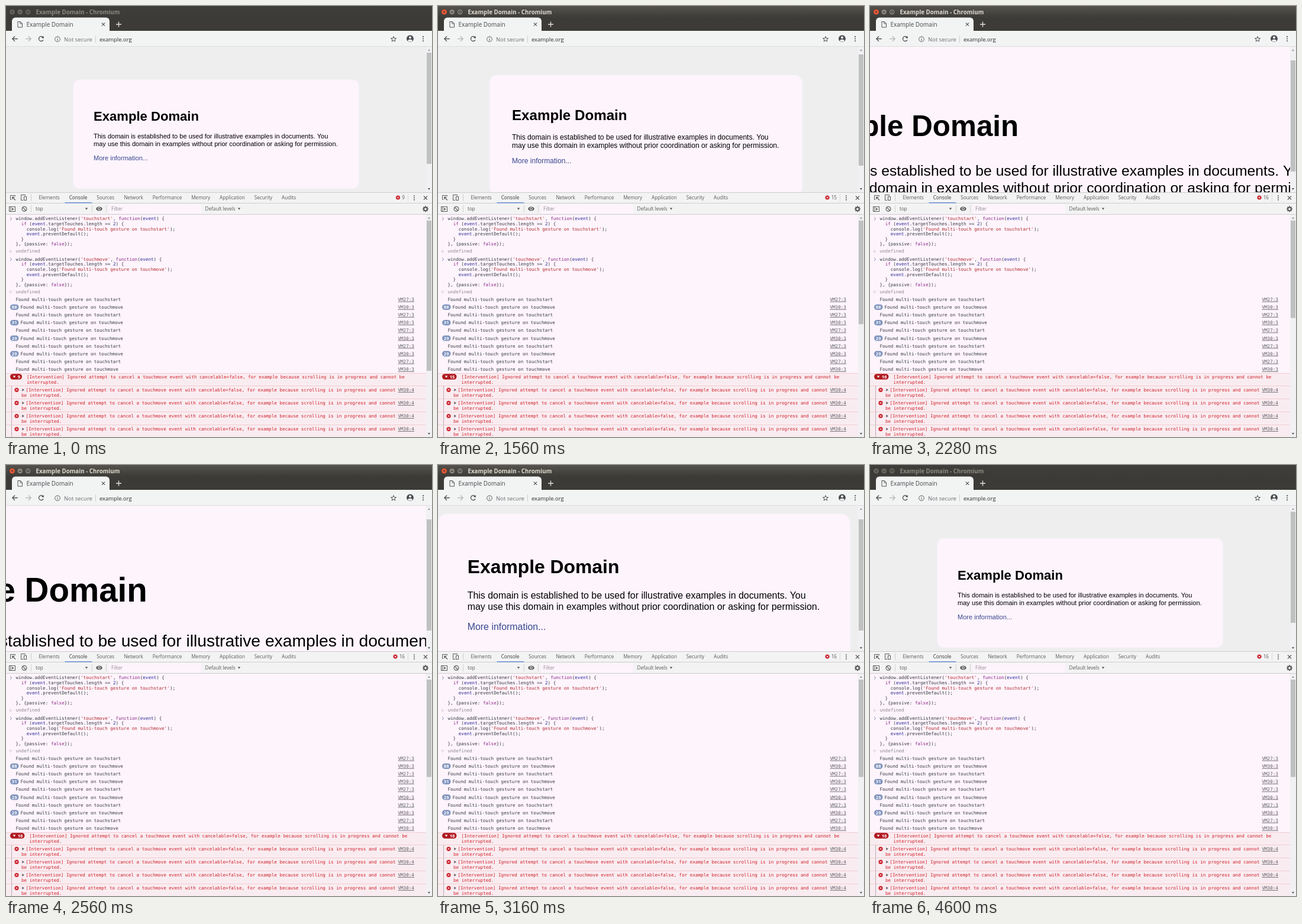
Recreate the animation shown at these times as an HTML page with a canvas. Size 720 px wide and 729 px high, loop 4640 ms.

```html
<!DOCTYPE html>
<html lang="en">
<head>
<meta charset="utf-8">
<title>Pinch zoom with console</title>
<style>
html, body { margin: 0; width: 100%; height: 100%; overflow: hidden; }
canvas { display: block; }
</style>
</head>
<body>
<canvas id="stage" width="720" height="729"></canvas>
<script>
const ctx = document.getElementById('stage').getContext('2d');
const LOOP = 4640, STEP = 40;
const UI = '"Open Sans", "Noto Sans", sans-serif';
const MONO = '"DejaVu Sans Mono", monospace';
const ARIAL = '"Liberation Sans", Arial, sans-serif';
const PAPER = '#fdf4fc', BAR = '#f3f3f3', INK = '#5a5a5a', RED = '#d0202a';
const CHAR = 4.57, ROW = 8.63;

// Two pinches out, two pinches back; x and y are the fixed point
const PINCHES = [
  { from: 1520, to: 2040, zoom: 1.838, x: 393, y: 199.5 },
  { from: 2085, to: 2640, zoom: 2.578, x: 381.5, y: 170.5 },
  { from: 2660, to: 2920, zoom: 1.858, x: 370, y: 218.5 },
  { from: 3040, to: 3560, zoom: 1, x: 370, y: 218.5 }
];

const clamp = (v, lo, hi) => Math.min(hi, Math.max(lo, v));
const easeOut = (p, power) => 1 - Math.pow(1 - p, power);
const mix = (a, b, p) => a + (b - a) * p;

function viewAt(t) {
  let { x, y } = PINCHES[0], z = 1;
  for (const g of PINCHES) {
    const p = clamp((t - g.from) / (g.to - g.from), 0, 1);
    z *= Math.pow(g.zoom / z, easeOut(p, 2));
    x = mix(x, g.x, easeOut(p, 2));
    y = mix(y, g.y, easeOut(p, 6));
  }
  return { x, y, z, scroll: 13 * clamp((z - 1) * 2.5, 0, 1) };
}

function newErrors(t) {
  const burst = (start, gap, n) => clamp(Math.floor((t - start) / gap) + 1, 0, n);
  return burst(560, 160, 2) + burst(1120, 100, 3) + burst(1560, 80, 2);
}

function rect(x, y, w, h, color) {
  ctx.fillStyle = color;
  ctx.fillRect(x, y, w, h);
}

function round(x, y, w, h, r, color) {
  ctx.beginPath();
  ctx.roundRect(x, y, w, h, r);
  ctx.fillStyle = color;
  ctx.fill();
}

function oval(x, y, rx, ry, color) {
  ctx.beginPath();
  ctx.ellipse(x, y, rx, ry, 0, 0, 7);
  ctx.fillStyle = color;
  ctx.fill();
}

const disc = (x, y, r, color) => oval(x, y, r, r, color);

function ring(x, y, r, color, width = 1, from = 0, to = 7) {
  ctx.beginPath();
  ctx.arc(x, y, r, from, to);
  ctx.strokeStyle = color;
  ctx.lineWidth = width;
  ctx.stroke();
}

// Each path is a flat list of x, y pairs
function lines(color, width, ...paths) {
  ctx.beginPath();
  for (const p of paths)
    for (let i = 0; i < p.length; i += 2)
      i ? ctx.lineTo(p[i], p[i + 1]) : ctx.moveTo(p[i], p[i + 1]);
  ctx.strokeStyle = color;
  ctx.lineWidth = width;
  ctx.stroke();
}

function cross(x, y, r, color, width = 1) {
  lines(color, width, [x - r, y - r, x + r, y + r], [x - r, y + r, x + r, y - r]);
}

// Triangle pointing right, turned by a number of quarter turns
function tri(x, y, r, turns, color) {
  ctx.save();
  ctx.translate(x, y);
  ctx.rotate(turns * Math.PI / 2);
  ctx.beginPath();
  ctx.moveTo(-r * 0.7, -r);
  ctx.lineTo(r * 0.8, 0);
  ctx.lineTo(-r * 0.7, r);
  ctx.fillStyle = color;
  ctx.fill();
  ctx.restore();
}

// Arrow with its tip at x, y; dir is 1 for right, -1 for left
function arrow(x, y, dir, color) {
  const back = x - dir * 4.2;
  lines(color, 1.3, [x - dir * 9, y, x, y], [back, y - 4.2, x, y, back, y + 4.2]);
}

function text(s, x, y, color, font, align = 'left') {
  ctx.font = font;
  ctx.fillStyle = color;
  ctx.textAlign = align;
  ctx.fillText(s, x, y);
}

const mono = (s, x, y, color = '#383b42') => text(s, x, y + 2.7, color, '7.59px ' + MONO);
const label = (s, x, y, color = INK, size = 8.2) => text(s, x, y, color, size + 'px ' + UI);

function dots(x, y, gap, color) {
  for (let i = -1; i <= 1; i++) disc(x, y + i * gap, 1.05, color);
}

function drawTitleBar(active) {
  const g = ctx.createLinearGradient(0, 0, 0, 20);
  g.addColorStop(0, active ? '#55534c' : '#3f3e3a');
  g.addColorStop(1, '#3c3b37');
  rect(0, 0, 720, 44, '#3c3b37');
  rect(0, 0, 720, 20, g);
  const mark = active ? '#373632' : '#3c3b37';
  for (let i = 0; i < 3; i++) {
    const x = 10.5 + i * 13.3;
    disc(x, 10, 5.3, active ? '#33322e' : '#353430');
    disc(x, 10, 4.6, active ? (i ? '#85827a' : '#ea5a37') : '#66645e');
  }
  cross(10.5, 10, 1.8, mark);
  lines(mark, 1, [22, 10.5, 26, 10.5]);
  ctx.strokeRect(35, 8.5, 4, 3);
  text('Example Domain - Chromium', 50.5, 13.5, active ? '#dfdbd2' : '#8d8a82', 'bold 9.75px ' + UI);
}

function drawBrowserBar() {
  const bg = '#f2f3f3', icon = '#505256';
  round(10, 19.5, 165, 30, 6, bg);
  rect(0, 42, 720, 27, bg);
  rect(0, 68, 720, 1, '#dddcde');

  lines('#555', 1, [20, 26.5, 24.5, 26.5, 27.5, 29.5, 27.5, 36, 20, 36, 20, 26], [24, 26.5, 24, 30, 27.5, 30]);
  label('Example Domain', 34.5, 34.5, '#45464a', 9.96);
  cross(164.5, 31, 2.6, icon, 1.1);
  lines('#e4e2de', 1.3, [186, 31, 195, 31], [190.5, 26.5, 190.5, 35.5]);

  arrow(10.8, 55.5, -1, icon);
  arrow(42.2, 55.5, 1, '#b7b8ba');
  ring(59.5, 55.5, 4, icon, 1.3, 0.5, 5.5);
  tri(62.8, 53.4, 2.4, 0.5, icon);

  ring(87, 56, 4.3, '#606266');
  rect(86.5, 55.3, 1, 3.2, '#606266');
  rect(86.5, 53.2, 1, 1.1, '#606266');
  label('Not secure', 98, 59.5, '#6b6d71', 9.5);
  rect(151, 50, 1, 12, '#cfcfd2');
  label('example.org', 158, 59.5, '#2d2e31', 9.45);

  const star = [];
  for (let i = 0; i <= 10; i++) {
    const a = i * Math.PI / 5 - Math.PI / 2, r = i % 2 ? 2 : 4.8;
    star.push(655 + r * Math.cos(a), 56.2 + r * Math.sin(a));
  }
  lines(icon, 1, star);
  disc(683, 55.2, 5.9, '#484a4e');
  disc(683, 53.2, 2, bg);
  oval(683, 58.4, 3.7, 2, bg);
  dots(705, 55.5, 3.6, icon);
}

function drawScrollbar(top, bottom, from, to) {
  rect(710, top, 10, bottom - top, '#f1f0f2');
  tri(715, top + 5.5, 2.1, 3, '#a0a0a2');
  tri(715, bottom - 5.5, 2.1, 1, '#606062');
  rect(711, from, 8, to - from, '#bfc0c0');
}

function drawPage(view) {
  ctx.save();
  ctx.beginPath();
  ctx.rect(0, 69, 710, 246);
  ctx.clip();
  rect(0, 69, 710, 246, '#eeeeef');
  ctx.translate(view.x, view.y);
  ctx.scale(view.z, view.z);
  ctx.translate(-view.x, -view.y);
  round(113.5, 124.2, 483, 184.8, 11, PAPER);
  const body = '11.04px ' + ARIAL;
  text('Example Domain', 148, 194, '#000', 'bold 22.08px ' + ARIAL);
  text('This domain is established to be used for illustrative examples in documents. You', 148, 224, '#000', body);
  text('may use this domain in examples without prior coordination or asking for permission.', 148, 236.7, '#000', body);
  text('More information...', 148, 260.7, '#38488f', body);
  ctx.restore();
  drawScrollbar(69, 315, 79 + view.scroll, 267 + view.scroll);
}

function errorIcon(x, y) {
  disc(x, y, 3.6, '#c9222c');
  cross(x, y, 1.4, '#fff', 0.9);
}

function drawTabs() {
  const names = ['Elements', 'Console', 'Sources', 'Network', 'Performance', 'Memory', 'Application', 'Security', 'Audits'];
  let x = 55.5;
  for (const name of names) {
    const on = name === 'Console';
    label(name, x, 327.3, on ? '#333' : INK);
    const width = ctx.measureText(name).width;
    if (on) rect(x - 7, 332, width + 15, 1.4, '#6590dc');
    x += width + 15.9;
  }
}

function drawTools(count) {
  rect(0, 315, 720, 38, BAR);
  for (const y of [315, 333, 352]) rect(0, y, 720, 1, '#cfcdcf');

  lines(INK, 1, [9, 327.5, 7.5, 327.5, 7.5, 320.5, 15.5, 320.5, 15.5, 322]);
  lines(INK, 1.2, [11, 323.5, 16, 328.5], [10.8, 327, 10.8, 323.3, 14.5, 323.3]);
  lines(INK, 1, [29, 328.5, 25.5, 328.5, 25.5, 319.5, 32.5, 319.5, 32.5, 321]);
  ctx.strokeRect(30.5, 322.5, 4, 6);
  rect(42, 318, 1, 12, '#cfcdcf');
  drawTabs();
  errorIcon(count > 9 ? 658 : 662.5, 324);
  text(count, 674, 327.2, INK, '8.2px ' + UI, 'right');
  rect(679, 318, 1, 12, '#dcdadc');
  dots(690, 324.5, 3.2, INK);
  cross(709, 324.5, 3, INK, 1.2);

  ctx.lineWidth = 1;
  ctx.strokeRect(5.5, 339.5, 10, 8);
  lines(INK, 1, [8, 340, 8, 347]);
  tri(11.8, 343.5, 2.3, 0, INK);
  ring(31, 343.3, 3.9, INK, 1.2);
  lines(INK, 1.2, [28.3, 340.6, 33.7, 346]);
  for (const x of [42, 145, 169]) rect(x, 337, 1, 12, '#d3d1d3');
  label('top', 50, 346.2);
  tri(136, 343, 2.3, 1, INK);
  oval(157.5, 343, 5.2, 3.6, INK);
  disc(157.5, 343, 2.4, BAR);
  disc(157.5, 343, 1.4, INK);
  rect(174, 335, 156, 16, PAPER);
  label('Filter', 178, 346.2, '#909092');
  label('Default levels', 336.5, 346.2);
  tri(394, 343, 2.3, 1, INK);
  for (let i = 0; i < 8; i++) {
    const a = i * Math.PI / 4, c = Math.cos(a), s = Math.sin(a);
    lines(INK, 1.8, [709 + 3 * c, 343.3 + 3 * s, 709 + 5 * c, 343.3 + 5 * s]);
  }
  ring(709, 343.3, 2.8, INK, 1.9);
}

function tokenColor(s) {
  if (s[0] === "'") return '#b42c30';
  if (/^(function|if|false)$/.test(s)) return '#8c2a88';
  if (/^(event|\d)$/.test(s)) return '#2b2b96';
  return '#383b42';
}

function drawCode(event, y) {
  const code = [
    `window.addEventListener('${event}', function(event) {`,
    '  if (event.targetTouches.length >= 2) {',
    `    console.log('Found multi-touch gesture on ${event}');`,
    '    event.preventDefault();',
    '  }',
    '}, {passive: false});'
  ];
  lines('#7890b8', 1, [7, y - 2, 9.8, y + 0.5, 7, y + 3]);
  code.forEach((line, row) => {
    let x = 16.5;
    for (const part of line.split(/('[^']*'|\b(?:function|if|false|event)\b|\b\d\b)/)) {
      mono(part, x, y + row * ROW, tokenColor(part));
      x += part.length * CHAR;
    }
  });
  const end = y + 55;
  lines('#b0aeb4', 0.9, [8.5, end - 2, 6, end + 0.5, 8.5, end + 3]);
  disc(10, end + 0.5, 0.6, '#b0aeb4');
  mono('undefined', 16.5, end, '#8a888c');
}

function link(s, y) {
  mono(s, 662.5, y, '#5c5a60');
  rect(662.5, y + 3.6, 27.5, 0.8, '#5c5a60');
}

function pill(x, y, w, h, color, s, cx) {
  round(x, y - h / 2, w, h, h / 2, color);
  text(s, cx, y + 2.8, '#fff', 'bold 7.6px ' + UI, 'center');
}

function drawMessages() {
  const repeats = [88, 31, 29, 29];
  for (let i = 0; i < 10; i++) {
    const y = 496.2 + i * 13.13, move = i % 2;
    const n = move && repeats[(i - 1) / 2];
    if (n) pill(7, y, 14.5, 9.4, '#7f93bd', n, 14.2);
    mono('Found multi-touch gesture on ' + (move ? 'touchmove' : 'touchstart'), n ? 24.5 : 16.5, y);
    link(move ? 'VM30:3' : 'VM27:3', y);
  }
}

function drawErrors(count) {
  const message = '[Intervention] Ignored attempt to cancel a touchmove event with cancelable=false, ' +
    'for example because scrolling is in progress and cannot';
  const wide = count > 9, x = wide ? 39.6 : 35;
  rect(0, 621, 710, 108, '#f9ecf0');
  rect(0, 621, 710, 1, '#f3ccd2');
  pill(7, 627, wide ? 24.5 : 20, 9.6, '#b0191f', count, wide ? 24 : 21.8);
  tri(14, 627.2, 2.3, 1, '#fff');
  mono(message + ' be', x, 627.3, RED);
  mono('interrupted.', x, 627.3 + ROW, RED);
  for (let i = 0; i < 4; i++) {
    const y = 649.3 + i * 22.1;
    rect(0, Math.round(y - 7.3), 710, 1, '#f3ccd2');
    errorIcon(18, y);
    tri(29, y, 2.4, 0, '#626064');
    mono(message, 33.5, y, RED);
    mono('be interrupted.', 26, y + ROW, RED);
    link('VM30:4', y);
  }
  rect(9, 642, 1, 87, '#b9adb2');
}

function draw(t) {
  const extra = newErrors(t), count = 9 + extra;
  drawTitleBar(t >= 560 && t < 4600);
  drawBrowserBar();
  drawPage(viewAt(t));
  drawTools(count);
  rect(0, 353, 720, 376, PAPER);
  drawCode('touchstart', 359.6);
  drawCode('touchmove', 428);
  drawMessages();
  drawErrors(count);
  drawScrollbar(353, 729, 363, 363 + 254 * Math.pow(0.94, extra));
}

function tick() {
  const t = performance.now() % LOOP;
  draw(Math.floor(t / STEP) * STEP);
  requestAnimationFrame(tick);
}
tick();
</script>
</body>
</html>
```
